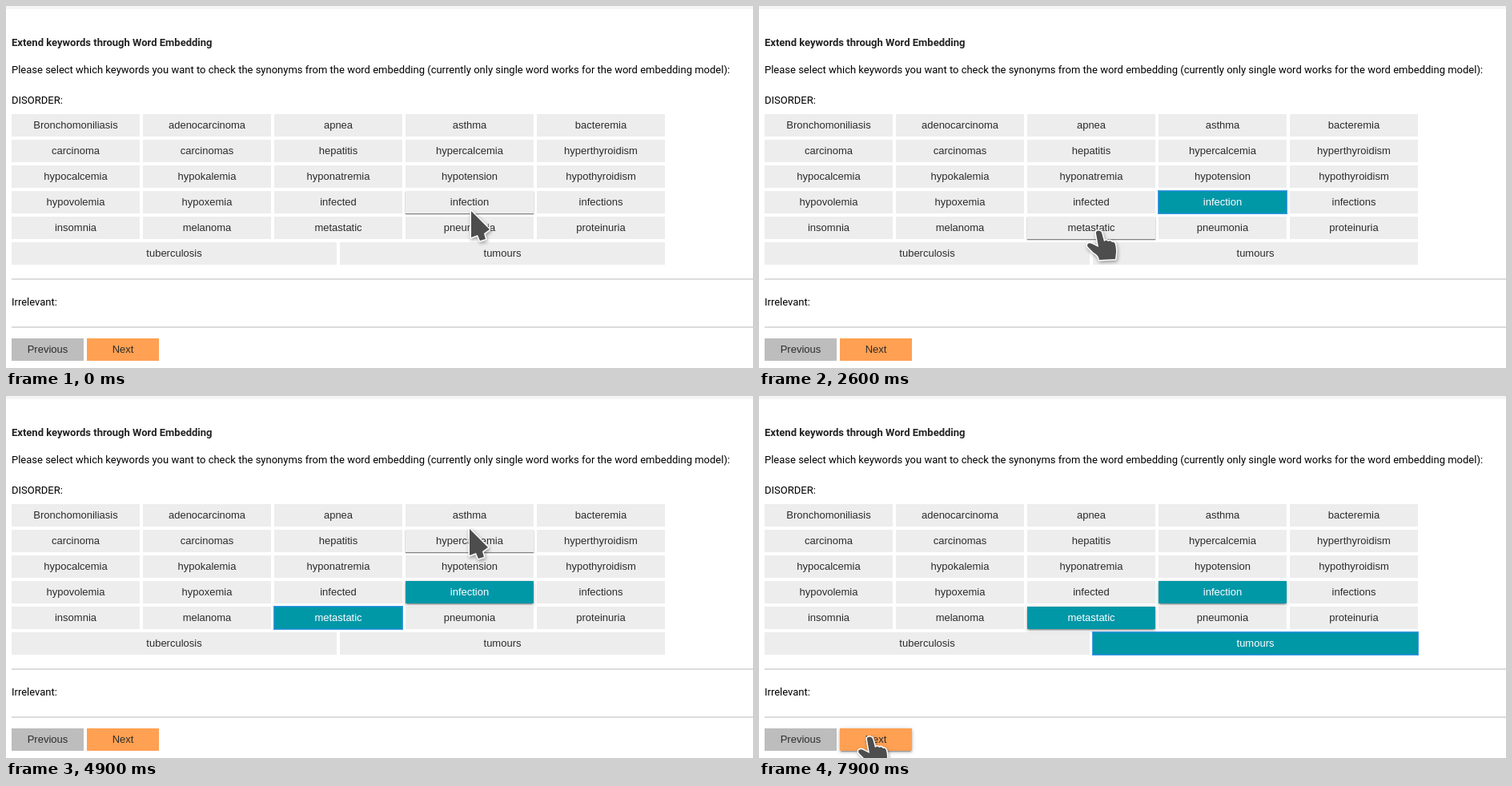
Recreate the animation shown at these times as an HTML page. Size 933x452 px, loop 8000 ms.

```html
<!DOCTYPE html>
<html lang="en">
<head>
<meta charset="utf-8">
<title>Extend keywords</title>
<style>
html, body { margin: 0; width: 100%; height: 100%; overflow: hidden; background: #fff; }
#stage { position: relative; width: 933px; height: 452px; overflow: hidden; font: 13px/20px Roboto, sans-serif; color: #000; }
#stage > * { position: absolute; white-space: nowrap; }
.bar { left: 0; top: 0; width: 933px; height: 4px; background: #f5f5f5; }
.rule { left: 7px; width: 926px; height: 2px; background: #dcdcdc; }
.text { left: 7px; }
.button { height: 28px; font: 13px/28px "Liberation Sans", Arial, sans-serif; text-align: center; color: #2c2c2c; background: #ededed; }
.hover { box-shadow: 0 1px 1px rgba(0,0,0,.42), 0 1px 2px rgba(0,0,0,.18); z-index: 1; }
.selected { background: #0097a7; color: #fff; z-index: 1; }
.selected, .action.hover { box-shadow: 0 2px 2px rgba(0,0,0,.14), 0 3px 1px -2px rgba(0,0,0,.2), 0 1px 5px rgba(0,0,0,.25); }
.focus { box-shadow: 0 0 0 1px #3d9be0, inset 0 0 0 1px #1490c8; }
#tip { z-index: 2; box-sizing: border-box; height: 26px; padding: 0 6px; border: 1px solid #717987; background: #4f5766; color: #c3c8d0; font: 16px/24px "DejaVu Sans", sans-serif; box-shadow: 2px 3px 8px rgba(0,0,0,.35); }
#cursor { z-index: 3; left: 0; top: 0; overflow: visible; filter: drop-shadow(1px 2px 2px rgba(0,0,0,.35)); }
#cursor path { fill: #4d4d4d; stroke: #fff; stroke-width: 3px; stroke-linejoin: round; paint-order: stroke; }
</style>
</head>
<body>
<div id="stage">
  <div class="bar"></div>
  <b class="text" style="top:36px;color:#222">Extend keywords through Word Embedding</b>
  <div class="text" style="top:70px">Please select which keywords you want to check the synonyms from the word embedding (currently only single word works for the word embedding model):</div>
  <div class="text" style="top:108px">DISORDER:</div>
  <div class="rule" style="top:340px"></div>
  <div class="text" style="top:360px">Irrelevant:</div>
  <div class="rule" style="top:400px"></div>
  <div id="tip"></div>
  <svg id="cursor" width="1" height="1">
    <path id="arrow" d="M1 1V34L9 31L12 38L19 36L17 29L24 24Z"/>
    <path id="hand" d="M-3 4C-4 0 2 -1 4 3L7 14Q10 11 12 14Q15 12 17 15Q20 14 21 18Q23 24 21 36L1 37Q0 31 -6 28L-13 21C-16 17 -11 15 -8 17L0 21Z"/>
  </svg>
</div>
<script>
const $ = id => document.getElementById(id);
const words = `Bronchomoniliasis adenocarcinoma apnea asthma bacteremia
  carcinoma carcinomas hepatitis hypercalcemia hyperthyroidism
  hypocalcemia hypokalemia hyponatremia hypotension hypothyroidism
  hypovolemia hypoxemia infected infection infections
  insomnia melanoma metastatic pneumonia proteinuria`.split(/\s+/);
const buttons = [];

function addButton(label, x, y, w, color) {
  const el = document.createElement("div");
  el.className = color ? "button action" : "button";
  el.textContent = label;
  el.style.cssText = `left:${x}px;top:${y}px;width:${w}px`;
  if (color) el.style.background = color;
  $("stage").append(el);
  buttons.push({ label, x, y, w, el });
}
words.forEach((word, i) => addButton(word, 7 + i % 5 * 164, 135 + Math.floor(i / 5) * 32, 160));
["tuberculosis", "tumours"].forEach((word, i) => addButton(word, 7 + i * 410, 295, 406));
addButton("Previous", 7, 415, 90, "#bdbdbd");
addButton("Next", 101, 415, 90, "#ffa052");

// The pointer rests at x, y between two times and eases from stop to stop
const STEP = 100, LOOP = 8000;
const stops = [
  { from: 0, to: 1700, x: 580, y: 255 },
  { from: 1900, to: 2100, x: 588, y: 250 },
  { from: 2400, to: 3000, x: 424, y: 280 },
  { from: 3300, to: 3300, x: 357, y: 304 },
  { from: 3900, to: 4200, x: 400, y: 316 },
  { from: 4800, to: 4800, x: 570, y: 200 },
  { from: 4900, to: 4900, x: 578, y: 165 },
  { from: 5100, to: 5100, x: 562, y: 158 },
  { from: 5400, to: 5900, x: 567, y: 319 },
  { from: 6400, to: 6800, x: 541, y: 158 },
  { from: 7100, to: 7100, x: 506, y: 330 },
  { from: 7400, to: 7400, x: 520, y: 315 },
  { from: 7900, to: LOOP, x: 138, y: 425 }
];
const clicks = { infection: 2100, metastatic: 2800, tumours: 7400 };
const tips = [[100, 600], [1400, 1600], [5800, 6000]];
const ease = k => k * k * (3 - 2 * k);

function cursorAt(t) {
  const i = stops.findLastIndex(s => s.from <= t);
  const a = stops[i];
  if (t <= a.to) return a;
  const b = stops[i + 1];
  const k = ease((t - a.to) / (b.from - a.to));
  return { x: Math.round(a.x + (b.x - a.x) * k), y: Math.round(a.y + (b.y - a.y) * k) };
}

function buttonAt(t) {
  if (t < 0) return;
  const { x, y } = cursorAt(t);
  return buttons.find(b => x >= b.x && x < b.x + b.w && y + 3 >= b.y && y + 3 < b.y + 28);
}

function draw(now) {
  const t = Math.floor(now % LOOP / STEP) * STEP;
  const { x, y } = cursorAt(t);
  const over = buttonAt(t);
  const chosen = Object.keys(clicks).filter(label => clicks[label] <= t);
  for (const b of buttons) {
    b.el.classList.toggle("hover", b === over);
    b.el.classList.toggle("selected", chosen.includes(b.label));
    b.el.classList.toggle("focus", chosen.at(-1) === b.label);
  }
  // The arrow turns into a hand one step after it enters a button
  const hand = over && over === buttonAt(t - STEP);
  $("hand").style.display = hand ? "" : "none";
  $("arrow").style.display = hand ? "none" : "";
  $("cursor").style.transform = `translate(${x}px,${y}px)`;

  const tip = $("tip");
  const showTip = over && tips.some(([from, to]) => t >= from && t < to);
  tip.style.display = showTip ? "" : "none";
  if (showTip) {
    tip.textContent = over.label;
    tip.style.left = x + 8 + "px";
    tip.style.top = y + 13 + "px";
  }
}

const start = performance.now();
function loop() {
  draw(performance.now() - start);
  requestAnimationFrame(loop);
}
loop();
</script>
</body>
</html>
```
